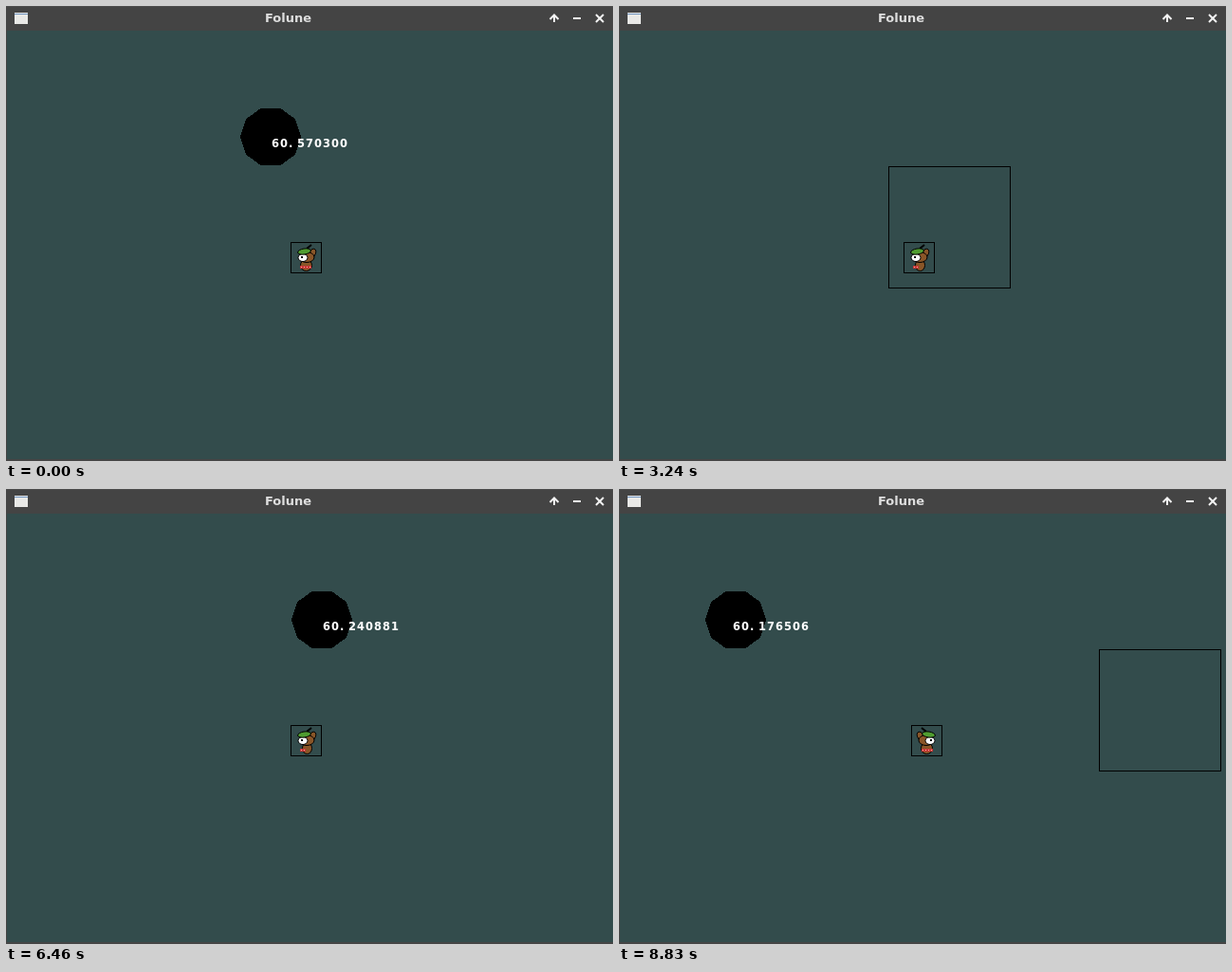
Write an HTML page with a canvas that moves like this. It is 640 px wide and 480 px high and loops after 8.85 s.

```html
<!DOCTYPE html>
<html lang="en">
<head>
<meta charset="utf-8">
<style>
  html, body { margin: 0; width: 640px; height: 480px; overflow: hidden; background: #334c4c; }
  canvas { display: block; }
</style>
</head>
<body>
<canvas id="stage" width="640" height="480"></canvas>
<script>
const ctx = document.getElementById('stage').getContext('2d');
const LOOP = 8850;
const STRIDE = 261;

// Key points: time in ms, x of the disc, displayed rate
const keys = [
  [0, 279, 60.570371],
  [225, 311, 60.554502],
  [1100, 193, 60.492791],
  [2240, 35, 60.421286],
  [3240, -99, 60.373526],
  [4210, 29, 60.327198],
  [5480, 203, 60.267610],
  [6880, 389, 60.229464],
  [7440, 315, 60.214205],
  [8830, 123, 60.176506]
];

function stateAt(t) {
  let i = 1;
  while (i < keys.length - 1 && keys[i][0] < t) i++;
  const [t0, x0, r0] = keys[i - 1], [t1, x1, r1] = keys[i];
  const k = Math.min(1, (t - t0) / (t1 - t0));
  return {
    x: 2 * Math.round((x0 + (x1 - x0) * k - 1) / 2) + 1,
    rate: r0 + (r1 - r0) * k,
    left: x1 > x0
  };
}

function box(color, x, y, w, h) {
  ctx.fillStyle = color;
  ctx.fillRect(x, y, w, h);
}

function outline(x, y, size) {
  ctx.strokeStyle = '#000';
  ctx.lineWidth = 1;
  ctx.strokeRect(x + 0.5, y + 0.5, size, size);
}

function stroke(color, width, ...pts) {
  ctx.strokeStyle = color;
  ctx.lineWidth = width;
  ctx.beginPath();
  pts.forEach(([x, y]) => ctx.lineTo(x, y));
  ctx.stroke();
}

// Crisp regular decagon, filled row by row
function disc(cx, cy, r) {
  const inner = r * Math.cos(Math.PI / 10);
  const reach = (dy, a) => (inner - dy * Math.sin(a)) / Math.cos(a);
  for (let y = Math.ceil(cy - inner); y + 0.5 < cy + inner; y++) {
    const dy = Math.abs(y + 0.5 - cy);
    const w = Math.round(Math.min(reach(dy, Math.PI * 0.1), reach(dy, Math.PI * 0.3)));
    box('#000', cx - w, y, 2 * w, 1);
  }
}

function counter(text, x, y) {
  ctx.font = 'bold 11.5px "DejaVu Sans", sans-serif';
  ctx.textAlign = 'left';
  ctx.fillStyle = '#fff';
  [...text].forEach((c, i) => ctx.fillText(c, x + i * 9, y));
}

function blob(color, x, y, rx, ry, turn = 0) {
  ctx.beginPath();
  ctx.ellipse(x, y, rx, ry, turn, 0, 2 * Math.PI);
  ctx.fillStyle = color;
  ctx.fill();
  ctx.strokeStyle = '#000';
  ctx.lineWidth = 1;
  ctx.stroke();
}

function bear(x, y, left, striding) {
  const fur = '#8a5628';
  ctx.save();
  ctx.translate(left ? x : x + 33, y);
  if (!left) ctx.scale(-1, 1);
  stroke('#000', 2, [17, 7], [22, 3]);
  blob(fur, 23.5, 11.5, 3, 4.5, 0.3);
  blob(fur, striding ? 17.5 : 16.5, 24.5, striding ? 5 : 6, 6);
  blob(fur, 17, 16, 8, 5.5);
  blob('#fff', 13, 16.5, 5, 4);
  box('#000', 11, 15, 2, 2);
  blob('#4f9c30', 14.5, 10, 7, 3, -0.15);
  const dots = striding ? 2 : 4;
  box('#c83434', 10, 25, dots * 3, 3);
  for (let i = 0; i < dots; i++) box('#f0b0a0', 11 + i * 3, 26, 1, 1);
  ctx.restore();
}

function windowFrame() {
  box('#444', 0, 0, 640, 26);
  box('#4b4b4b', 0, 0, 640, 1);
  box('#444', 0, 26, 1, 454);
  box('#444', 0, 478, 640, 2);

  box('#e9e9e7', 9, 7, 14, 12);
  box('#6f93c0', 9, 8, 14, 1);

  ctx.font = 'bold 13px "DejaVu Sans", sans-serif';
  ctx.textAlign = 'center';
  ctx.fillStyle = '#dedede';
  ctx.fillText('Folune', 297.5, 17);

  const white = '#f4f4f4';
  stroke(white, 2, [578, 17], [578, 10]);
  stroke(white, 2, [573.5, 14], [578, 9.5], [582.5, 14]);
  stroke(white, 2, [598, 13], [606, 13]);
  stroke(white, 2, [622, 9], [630, 17]);
  stroke(white, 2, [630, 9], [622, 17]);
}

function draw(t) {
  const { x, rate, left } = stateAt(t);
  const striding = Math.floor(t / STRIDE + 2 / 3) % 2 === 1;
  const heroX = left ? 300 : 308;

  box('#334c4c', 0, 0, 640, 480);
  disc(x, 138, 32);
  outline(x + 383, 169, 128);
  bear(heroX, 249, left, striding);
  outline(heroX, 249, 32);
  counter(rate.toFixed(6), x + (left ? 1 : -3), 149);
  windowFrame();
}

const start = performance.now();
function tick() {
  draw((performance.now() - start) % LOOP);
  requestAnimationFrame(tick);
}
tick();
</script>
</body>
</html>
```
